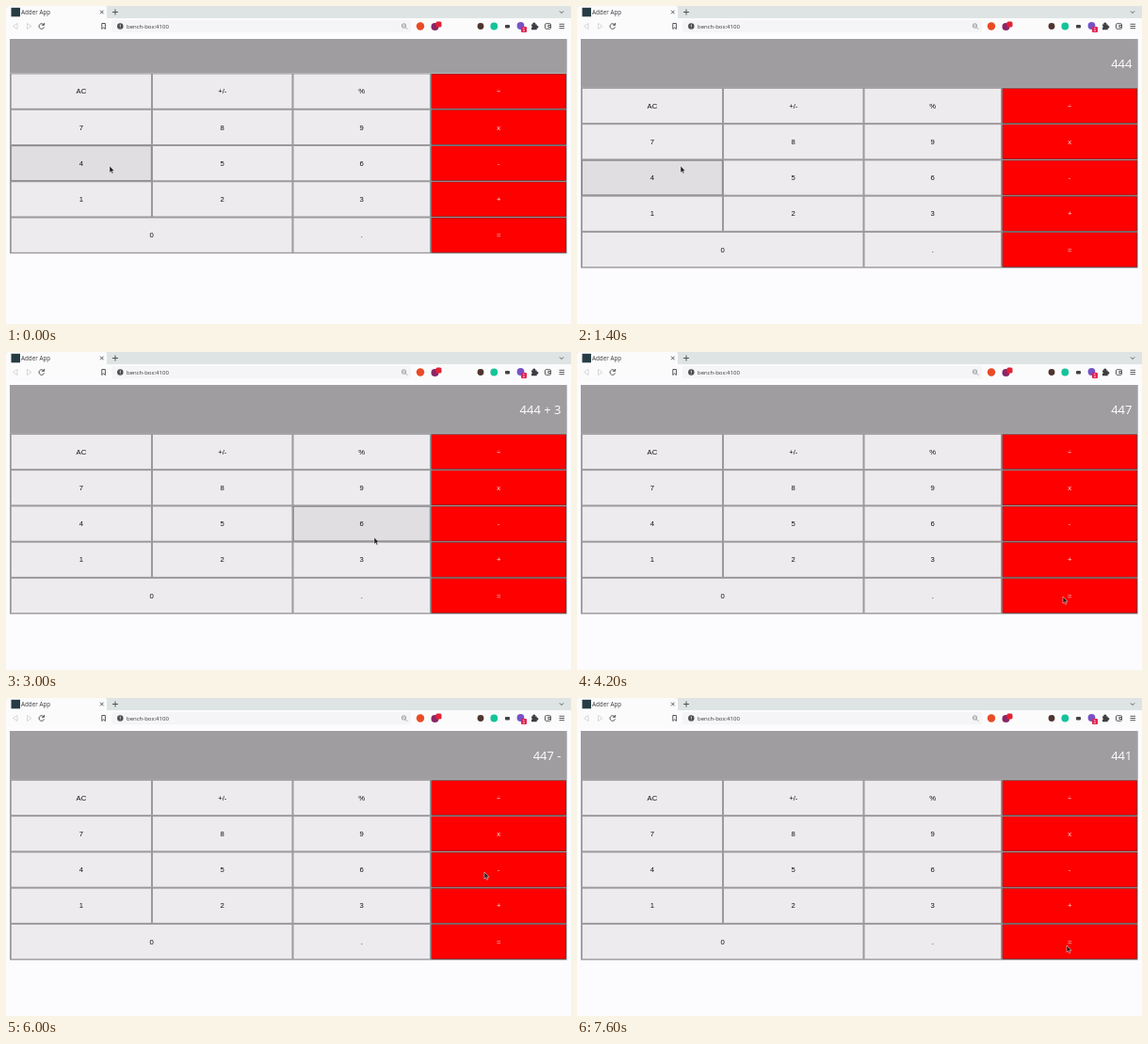
These frames come from a looping animation (600 px wide and 338 px high, 8 s). An HTML page:

```html
<!DOCTYPE html>
<html lang="en">
<head>
<meta charset="utf-8">
<title>Calculator</title>
<style>
  html, body { margin: 0; width: 100%; height: 100%; overflow: hidden; background: #fcfbfe; }
  svg { display: block; width: 100vw; height: 100vh; }
  text { font-family: "Liberation Sans", Arial, sans-serif; }
  .ui { font-family: "Open Sans", "Noto Sans", sans-serif; font-size: 6px; fill: #36373a; }
  .key { font-size: 7.7px; text-anchor: middle; fill: #111; }
  .red { fill: #ffe3df; }
  #value { font-family: "Open Sans", "Noto Sans", sans-serif; font-size: 13px; text-anchor: end; fill: #fff; }
  .line { fill: none; stroke: #46474a; stroke-width: .9; }
</style>
</head>
<body>
<svg id="stage" viewBox="0 0 600 338">
  <rect width="600" height="338" fill="#fcfbfe"/>
  <rect width="600" height="13" fill="#dee4e3"/>
  <path d="M0 13V2Q0 0 2 0H105Q107 0 107 2V13Z" fill="#fbfbfc"/>
  <rect y="13" width="600" height="17" fill="#fbfbfc"/>
  <rect x="112" y="15" width="318" height="13" rx="2" fill="#f5f5f7"/>

  <rect x="5.5" y="1.8" width="9.5" height="9.5" fill="#263b43"/>
  <text class="ui" x="16" y="8.8" style="font-size:6.3px;font-weight:500">Adder App</text>
  <path class="line" d="M100 4.7l3.6 3.6m0-3.6l-3.6 3.6M113 6.5h6m-3-3v6M588 5.5l2 2 2-2"/>

  <path d="M12 18.5v6L7.5 21.5ZM22.5 18.5v6L27 21.5Z" fill="none" stroke="#c9c9cc" stroke-width=".7"/>
  <path class="line" d="M40 19.8a2.8 2.8 0 1 0 .5 2.6M40.6 18v2.4h-2.4M101.8 18.5h3.6v6l-1.8-1.6-1.8 1.6Z"/>
  <circle cx="121.3" cy="21.5" r="3.2" fill="#4b4c50"/>
  <path d="M121.3 19.6v2.3m0 .7v.8" stroke="#fff" stroke-width=".8"/>
  <text class="ui" x="128" y="23.6">bench-box:4100</text>
  <g class="line" style="stroke:#77787b;stroke-width:.7">
    <circle cx="422.5" cy="21" r="2.2"/><path d="M424.2 22.7l2 2M421.4 21h2.2"/>
  </g>

  <circle cx="440" cy="21.5" r="4.2" fill="#e94b25"/>
  <circle cx="455.5" cy="22" r="4" fill="#8a2668"/>
  <rect x="456.5" y="16.5" width="6" height="6" rx="1.5" fill="#e22235"/>
  <circle cx="504" cy="21.5" r="3.4" fill="#4f3430"/>
  <circle cx="518.3" cy="21.5" r="3.9" fill="#15c39a"/>
  <rect x="530" y="20" width="5" height="3.4" rx="1" fill="#424347"/>
  <circle cx="546.5" cy="21" r="3.9" fill="#7652c6"/>
  <rect x="547" y="22" width="6" height="6" rx="1" fill="#e22252"/>
  <text x="550" y="27" font-size="5" text-anchor="middle" fill="#fff">1</text>
  <path d="M558 19.5h1.5a1.4 1.4 0 1 1 2.6 0h1.6v1.6a1.3 1.3 0 1 1 0 2.5v1.6h-5.7v-2a1.3 1.3 0 0 0 0-2.3Z" fill="#3d3e42"/>
  <g class="line"><rect x="572.5" y="18.7" width="6" height="5.6" rx="1"/><path d="M578.5 20.5h-2.6v2h2.6M587.5 19.3h5.5m-5.5 2.2h5.5m-5.5 2.2h5.5"/></g>

  <rect id="panel" x="4" y="35" width="591.7" fill="#9f9da0"/>
  <text id="value" x="589.5" y="66"></text>
  <g id="keys"></g>
  <path id="cursor" d="M0 0V7.2L1.6 5.8 2.7 8.3 3.9 7.8 2.8 5.3H5Z" fill="#1d1d1f" stroke="#f5f5f5" stroke-width=".5"/>
</svg>
<script>
const LOOP = 8000, ROW = 38.25, SHIFT = 15.4, TOP = 71.5;
const cols = [4.8, 155, 304.5, 451, 595.3];
const rows = ["AC,+/-,%,÷", "7,8,9,x", "4,5,6,-", "1,2,3,+", "0,,.,="];
const $ = id => document.getElementById(id);

// start ms, display, cursor x, cursor y, mouse down
const steps = [
  [0, "", 110, 170],
  [200, "", 110, 170, 1],
  [400, "4", 110, 170],
  [800, "4", 110, 170, 1],
  [1000, "44", 110, 170],
  [1200, "44", 110, 170, 1],
  [1400, "444", 110, 170],
  [1600, "444", 190, 182],
  [1800, "444", 368, 206],
  [2000, "444", 495, 220],
  [2200, "444", 512, 222, 1],
  [2400, "444 +", 508, 222],
  [2600, "444 +", 398, 218, 1],
  [2800, "444 + 3", 390, 212],
  [3000, "444 + 3", 391, 197],
  [3200, "444 + 3", 458, 222],
  [3400, "444 + 3", 508, 252],
  [3600, "444 + 3", 516, 260],
  [3800, "444 + 3", 516, 260, 1],
  [4000, "447", 516, 260],
  [5000, "447", 516, 256],
  [5200, "447", 515, 242],
  [5400, "447", 515, 203],
  [5600, "447", 515, 185],
  [5800, "447", 515, 185, 1],
  [6000, "447 -", 508, 185],
  [6200, "447 -", 420, 186],
  [6400, "447 -", 388, 186],
  [6600, "447 -", 388, 186, 1],
  [6800, "447 - 6", 390, 188],
  [7000, "447 - 6", 455, 226],
  [7200, "447 - 6", 518, 260],
  [7400, "447 - 6", 520, 263, 1],
  [7600, "441", 520, 263]
];

function add(tag, attrs, text = "") {
  const el = document.createElementNS("http://www.w3.org/2000/svg", tag);
  for (const name in attrs) el.setAttribute(name, attrs[name]);
  el.textContent = text;
  return $("keys").appendChild(el);
}

add("rect", { x: 4, y: TOP, width: 591.7, height: ROW * 5 + .4, fill: "#9b999c" });
const keys = [];
rows.forEach((line, r) => line.split(",").forEach((label, c) => {
  if (!label) return;
  const wide = label === "0", red = c === 3;
  const x = cols[c], right = cols[wide ? 2 : c + 1], y = TOP + r * ROW;
  const w = right - x;
  if (red) add("rect", { x: x + .6, y: y + .6, width: w - 1, height: ROW - 1, fill: "#593737" });
  const face = add("rect", {
    x: x + 1, y: y + 1, width: w - 2, height: ROW - 2, fill: red ? "#fe0000" : "#edebee"
  });
  const edge = add("rect", {
    x: x + .8, y: y + .8, width: w - 1.6, height: ROW - 1.6,
    fill: "none", stroke: "#858387", "stroke-width": .7, visibility: "hidden"
  });
  add("text", { class: red ? "key red" : "key", x: x + w / 2, y: y + ROW / 2 + 2.7 }, label);
  keys.push({ x, right, y, red, face, edge });
}));

function draw(now) {
  const t = now % LOOP;
  const [, value, x, y, down] = steps.findLast(step => step[0] <= t);
  const shift = value ? SHIFT : 0;
  $("value").textContent = value;
  $("panel").setAttribute("height", TOP - 35 + shift);
  $("keys").setAttribute("transform", `translate(0 ${shift})`);
  $("cursor").setAttribute("transform", `translate(${x} ${y})`);
  for (const key of keys) {
    if (key.red) continue;
    const top = key.y + shift;
    const over = x >= key.x && x < key.right && y >= top && y < top + ROW;
    key.face.setAttribute("fill", !over ? "#edebee" : down ? "#f3f4f6" : "#e0dee1");
    key.edge.setAttribute("visibility", over && !down ? "visible" : "hidden");
  }
}

function tick() {
  draw(performance.now());
  requestAnimationFrame(tick);
}
tick();
</script>
</body>
</html>
```
